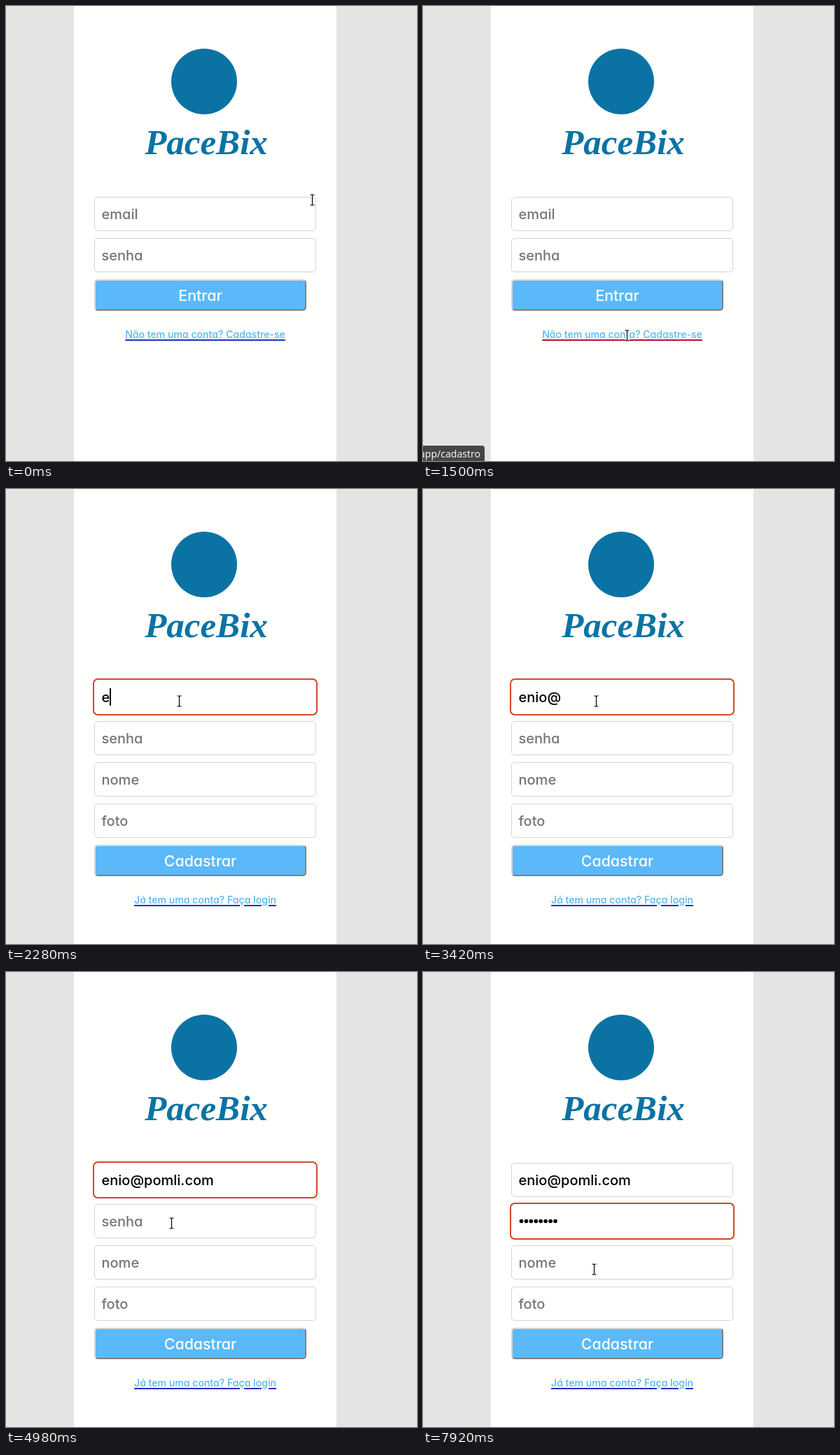
Recreate the animation shown at these times as an HTML page. Size 587 by 651 pixels, loop 8 s.

```html
<!DOCTYPE html>
<html lang="pt">
<head>
<meta charset="utf-8">
<title>Cadastro</title>
<style>
html, body { margin: 0; width: 100%; height: 100%; overflow: hidden; background: #e4e4e3; }
body { font: 450 20px Inter, "Noto Sans", sans-serif; font-feature-settings: "cv11"; }
div, svg { position: absolute; box-sizing: border-box; }
#stage { width: 587px; height: 651px; overflow: hidden; }
#panel { left: 97px; width: 375px; height: 651px; background: #fffffe; }
#mark { left: 236px; top: 61px; width: 94px; height: 94px; border-radius: 50%; background: #0a73a4; }
#brand { left: 97px; width: 378px; top: 165px; text-align: center; color: #0a73a4;
  font: italic bold 51px/60px "Liberation Serif", serif; }
.field { left: 126px; width: 317px; height: 49px; padding-left: 9.5px; display: flex; align-items: center;
  border: 1px solid #d4d4d4; border-radius: 5px; background: #fffffe; }
.field.on { border-color: #fffffe; box-shadow: 0 0 0 2px #cf4a28; }
.hint { color: #757575; }
.caret { width: 2px; height: 25px; margin-right: -2px; background: #000; visibility: hidden; }
.dots { height: 7px; background: radial-gradient(circle, #000 2.6px, transparent 3.2px) 0 0 / 6.95px 7px; }
#button { left: 126px; width: 303px; height: 45px; border: 2px outset #d5d5d5; border-radius: 5px;
  background: #5bb9fa; color: #fff; font-size: 21.4px; line-height: 43px; text-align: center; }
#link { left: 97px; width: 375px; font-size: 14.1px; line-height: 20px; text-align: center; color: #52b6f5;
  text-decoration: underline 1.5px #2430c0; text-underline-offset: 1.5px; }
#link.pressed { text-decoration-color: #b01238; }
#status { left: 0; top: 629px; width: 88px; height: 22px; border-radius: 0 4px 0 0; overflow: hidden;
  background: #464644; }
#status span { position: absolute; right: 6px; white-space: nowrap; color: #f4f4f4;
  font: 14px/23px "Noto Sans", "Open Sans", sans-serif; }
svg { left: 0; top: 0; fill: none; }
</style>
</head>
<body>
<div id="stage">
  <div id="panel"></div>
  <div id="mark"></div>
  <div id="brand">PaceBix</div>
  <div id="form"></div>
  <div id="button"></div>
  <div id="link"></div>
  <div id="status"><span>.app/cadastro</span></div>
  <svg width="587" height="651">
    <defs><path id="ibar" d="M-3-7.5H-1L0-6.5 1-7.5H3M0-6.5V6.5M-3 7.5H-1L0 6.5 1 7.5H3"/></defs>
    <g id="mouse">
      <g id="beam">
        <use href="#ibar" stroke="#fff" stroke-width="3"/>
        <use href="#ibar" stroke="#000" stroke-width="1.2"/>
      </g>
      <path id="arrow" d="M0 0V15L3.5 11.8 6 17.3 8.6 16.2 6.2 10.8H11Z" fill="#111" stroke="#fff"/>
    </g>
  </svg>
</div>
<script>
const LOOP = 8000, TICK = 60;
const EMAIL = "enio@pomli.com", DOT = 6.95;
const PRESS = 1440, OPEN = 1560, EMAIL_FOCUS = 1860, PASS_FOCUS = 5280;

const $ = id => document.getElementById(id);
const show = (el, on) => el.style.visibility = on ? "visible" : "hidden";
const within = (t, a, b) => t >= a && t < b;
const clamp = (v, lo, hi) => Math.min(hi, Math.max(lo, v));

// Keys struck so far in a burst of `count` keys, `gap` ms apart
const burst = (t, start, gap, count) => clamp(Math.floor((t - start) / gap) + 1, 0, count);
const emailKeys = t => burst(t, 2280, 120, 4) + burst(t, 3120, TICK, 1) + burst(t, 3660, 95, 9);
const passKeys = t => burst(t, 5760, 150, 6) + burst(t, 6780, 300, 2);

// Each move runs from the last point to `to`, bending towards `via` if given
const start = [437, 277];
const moves = [
  { from: 0, until: 840, to: [297, 490], via: [530, 500] },
  { from: 960, until: 1260, to: [291, 471] },
  { from: OPEN, until: EMAIL_FOCUS, to: [247, 303] },
  { from: 4920, until: 4980, to: [236, 359] },
  { from: 5100, until: 5160, to: [233, 358] },
  { from: 7080, until: 7320, to: [308, 331] },
  { from: 7560, until: 7920, to: [244, 425], via: [830, 30] }
];

function mouseAt(t) {
  return moves.reduce((p, { from, until, to, via }) => {
    const k = clamp((t - from) / (until - from), 0, 1);
    return p.map((a, i) => {
      const mid = via ? via[i] : (a + to[i]) / 2;
      return a * (1 - k) ** 2 + 2 * mid * k * (1 - k) + to[i] * k * k;
    });
  }, start);
}

const fields = ["email", "senha", "nome", "foto"].map((name, i) => {
  const box = document.createElement("div");
  box.className = "field";
  box.style.top = 273 + 59 * i + "px";
  const [value, caret, hint] = ["value", "caret", "hint"].map(kind => {
    const part = document.createElement("span");
    part.className = kind;
    box.append(part);
    return part;
  });
  hint.textContent = name;
  $("form").append(box);
  return { box, value, caret, hint };
});
const [email, pass] = fields;
pass.value.className = "dots";

function setField(field, filled, focused, caretOn) {
  field.box.classList.toggle("on", focused);
  show(field.hint, !filled);
  show(field.caret, caretOn);
}

function drawForm(t) {
  const signup = t >= OPEN, shift = signup ? 118 : 0;
  fields.forEach((f, i) => f.box.style.display = signup || i < 2 ? "" : "none");
  $("button").style.top = 391 + shift + "px";
  $("button").textContent = signup ? "Cadastrar" : "Entrar";
  $("link").style.top = 459.5 + shift + "px";
  $("link").textContent = signup ? "Já tem uma conta? Faça login" : "Não tem uma conta? Cadastre-se";
  $("link").classList.toggle("pressed", within(t, PRESS, OPEN));
  show($("status"), within(t, 1080, OPEN + TICK));

  const letters = emailKeys(t), dots = passKeys(t);
  email.value.textContent = EMAIL.slice(0, letters);
  pass.value.style.width = dots * DOT + "px";
  const emailCaret = within(t, EMAIL_FOCUS, 4800) && !within(t, 3420, 3660);
  setField(email, letters, within(t, EMAIL_FOCUS, PASS_FOCUS), emailCaret);
  setField(pass, dots, t >= PASS_FOCUS, within(t, PASS_FOCUS, 7320));
}

function drawMouse(t) {
  const [x, y] = mouseAt(t);
  const row = (y - 273) / 59;
  const overField = within(x, 126, 443) && within(row, 0, t >= OPEN ? 4 : 2) && row % 1 < 49 / 59;
  const text = overField || within(t, PRESS, OPEN);
  $("mouse").setAttribute("transform", `translate(${Math.round(x) + .5} ${Math.round(y) + .5})`);
  show($("beam"), text);
  show($("arrow"), !text);
}

function frame() {
  const t = Math.floor(performance.now() % LOOP / TICK) * TICK;
  drawForm(t);
  drawMouse(t);
  requestAnimationFrame(frame);
}
frame();
</script>
</body>
</html>
```
